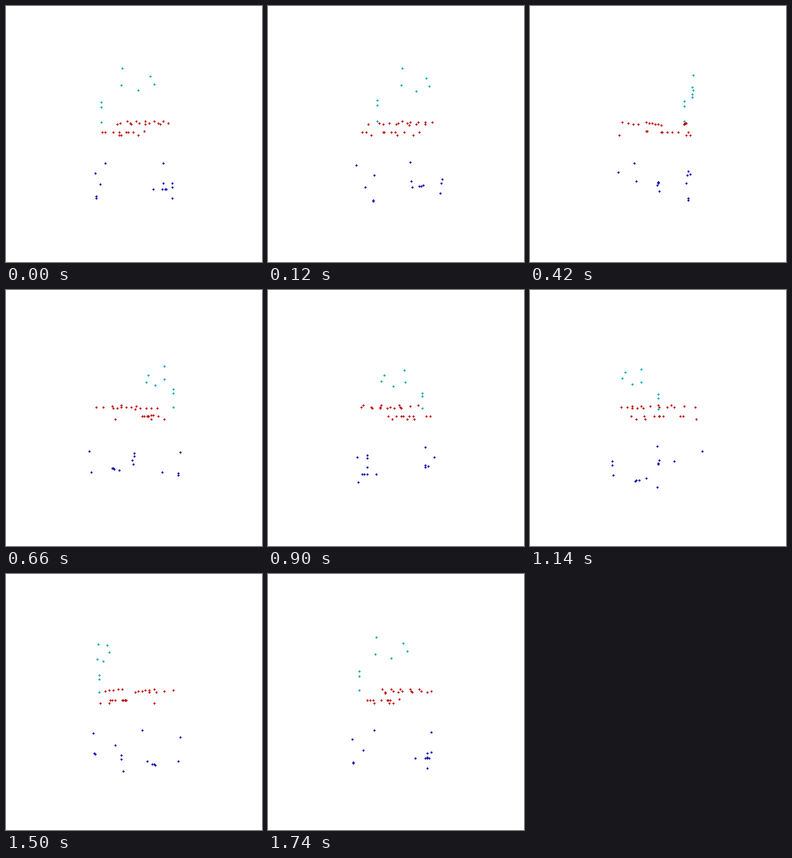
A matplotlib script that plays this animation: 256 px wide and 256 px high, repeating every 1800 ms.

```python
from itertools import product

import numpy as np
import matplotlib.pyplot as plt
from matplotlib.animation import FuncAnimation

SIZE, DPI = 256, 100
FRAMES, STEP = 30, 60
CENTER = np.array([127.7, 128.2])
EYE = 220  # camera distance in pixels

# Chair dimensions: across, towards the viewer, down
HALF_W, HALF_D = 33, 31
TOP, UNDER = -11.2, -2.4
KNEE, FLOOR = 33, 55
BACK, POST = 34.5, 25.7


def rail(a, b, n, bunch=1):
    """n points from a to b; bunch above 1 crowds them towards a."""
    t = np.linspace(0, 1, n)[:, None] ** bunch
    return np.array(a) + t * (np.array(b) - a)


def chair_back():
    return np.vstack([
        rail((-9.6, BACK, -55.6), (-10.6, BACK, -41.5), 2),
        rail((13.7, BACK, -49.4), (17.1, BACK, -42.5), 2),
        rail((3.4, BACK, -37), (3.4, BACK, -37), 1),
        rail((-29, POST, -28.7), (-29, POST, TOP), 3, 2),
    ])


def chair_seat():
    return np.vstack([
        rail((-19, -31, TOP), (29, -26, TOP), 4),
        rail((-14, -10, TOP), (34.5, 0, TOP), 6),
        rail((-6, 28, TOP), (26, 26, TOP), 5),
        rail((-33, -7, UNDER), (-29, -6, UNDER), 2),
        rail((-19, 15, UNDER), (-14, 4.5, UNDER), 2),
        rail((-7.5, 4.7, UNDER), (-0.5, 20.6, UNDER), 3, 1.6),
        rail((9, 30, UNDER), (3.8, 28.5, 1), 2),
        rail((-15, -35, 1), (-12.8, 31, 1), 2),
    ])


def chair_legs():
    parts = [
        rail((19.5, -2.8, FLOOR), (HALF_W, -2.8, FLOOR), 4, 0.35),
        rail((-HALF_W, 4.7, 48.4), (-HALF_W, 4.7, 48.4), 1),
    ]
    # Denser sampling towards the near corners
    for (sx, sz), n in zip(product((-1, 1), repeat=2), (1, 3, 2, 3)):
        x, z = sx * HALF_W, sz * HALF_D
        knee = KNEE + 9 * (sx > 0 and sz > 0)
        bunch = 0.1 if sx < 0 else 1.8
        parts.append(rail((x, z, knee), (x, z - 2 * sz, FLOOR), n, bunch))
    return np.vstack(parts)


def project(points, angle):
    x, z, y = points.T
    c, s = np.cos(angle), np.sin(angle)
    scale = 1 / (1 - (z * c - x * s) / EYE)
    return CENTER + np.column_stack([(x * c + z * s) * scale, y * scale])


fig = plt.figure(figsize=(SIZE / DPI, SIZE / DPI), dpi=DPI, facecolor="white")
ax = fig.add_axes([0, 0, 1, 1])
ax.set(xlim=(0, SIZE), ylim=(SIZE, 0))
ax.axis("off")

clouds = [
    (pts, ax.scatter(pts[:, 0], pts[:, 1], s=2.2, c=color,
                     linewidths=0, antialiased=False))
    for pts, color in ((chair_legs(), "#0000b4"), (chair_seat(), "#c00000"),
                       (chair_back(), "#00a4a4"))
]


def update(i):
    angle = 2 * np.pi * i / FRAMES
    for pts, dots in clouds:
        dots.set_offsets(project(pts, angle))
    return [dots for _, dots in clouds]


anim = FuncAnimation(fig, update, frames=FRAMES, interval=STEP,
                     repeat=True, repeat_delay=0)
plt.show()
```
